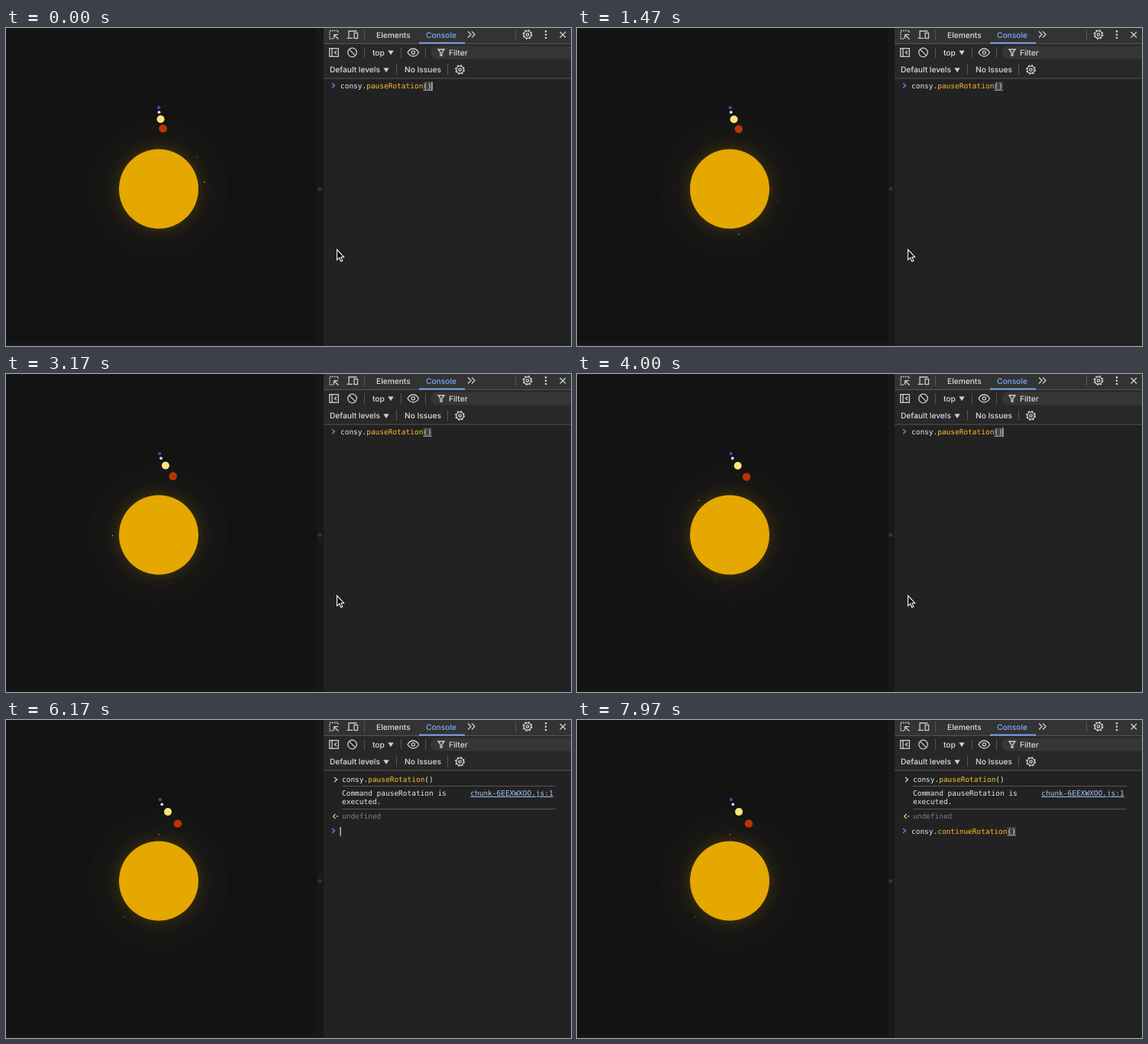
An HTML page for the animation above (8 s loop, 740 px wide and 416 px high).

```html
<!DOCTYPE html>
<html lang="en">
<head>
<meta charset="utf-8">
<title>Console and orbits</title>
<style>
  html, body { margin: 0; width: 100%; height: 100%; overflow: hidden; background: #131313; }
  svg { display: block; width: 740px; height: 416px; }
  text { text-rendering: geometricPrecision; white-space: pre; }
  .ui { font: 500 10.2px Inter, sans-serif; fill: #dedede; }
  .code { font: 9.48px "DejaVu Sans Mono", monospace; fill: #e8e8e8; }
  .fn { fill: #fbbf2d; }
  .line { fill: none; stroke: #cfcfcf; stroke-width: 1.3; }
  .rule { fill: none; stroke: #555; }
  .prompt { fill: none; stroke: #5c92ee; stroke-width: 1.3; }
</style>
</head>
<body>
<svg viewBox="0 0 740 416">
  <defs>
    <radialGradient id="glow" gradientUnits="userSpaceOnUse" cx="200" cy="210.5" r="92">
      <stop offset=".56" stop-color="#e5a800" stop-opacity=".13"/>
      <stop offset=".64" stop-color="#e5a800" stop-opacity=".065"/>
      <stop offset=".76" stop-color="#b09040" stop-opacity=".025"/>
      <stop offset="1" stop-color="#999" stop-opacity=".012"/>
    </radialGradient>
    <g id="gear">
      <circle r="4.7" class="line"/>
      <circle r="5.6" class="line" stroke-dasharray="2.2 2.2" style="stroke-width:1.7"/>
      <circle r="1.7" class="line"/>
    </g>
    <path id="chevron" d="M-2-3 1.5 0-2 3"/>
    <path id="caretDown" d="M-3.7-2.5H3.7L0 3.2Z" fill="#cfcfcf"/>
  </defs>

  <rect width="740" height="416" fill="#131313"/>
  <rect y="411.5" width="416" height="4.5" fill="#181818"/>
  <circle cx="200" cy="210.5" r="92" fill="url(#glow)"/>
  <circle cx="200" cy="210.5" r="52" fill="#e5a800"/>
  <g id="orbits"></g>

  <rect x="407" width="9" height="416" fill="#181818"/>
  <circle cx="411" cy="210.5" r="2.6" fill="#333"/>

  <rect x="416" width="324" height="416" fill="#222"/>
  <rect x="416" width="324" height="20" fill="#333"/>
  <rect x="416" y="20" width="324" height="46" fill="#282828"/>
  <path class="rule" d="M416 20.5H740M416 66H740"/>
  <path class="rule" d="M469.5 2V16M667.5 2V16M469.5 25V39M517.5 25V39M549.5 25V39M511.5 47V61M578.5 47V61"/>
  <rect x="541" y="18.7" width="60" height="1.8" fill="#7cacf8"/>

  <path class="line" d="M428 14H424V3.5H435V7" stroke-dasharray="1.7 1.2"/>
  <path class="line" d="M429.5 8.7H435M429.5 8.7V14M429.5 8.7 435.5 14.7"/>
  <path class="line" d="M459.5 4H449V12.5M446.5 13.3H454"/>
  <rect class="line" x="456" y="6.5" width="4.5" height="7"/>
  <path class="line" d="M605 4.5 609 8.5 605 12.5M610 4.5 614 8.5 610 12.5"/>
  <use href="#gear" x="683" y="8.5"/>
  <g fill="#cfcfcf"><circle cx="707" cy="4.4" r="1.3"/><circle cx="707" cy="8.7" r="1.3"/><circle cx="707" cy="13" r="1.3"/></g>
  <path class="line" d="M725.5 5 733 12.5M733 5 725.5 12.5"/>
  <text class="ui" x="485" y="12.6">Elements</text>
  <text class="ui" x="550" y="12.6" style="fill:#7cacf8">Console</text>

  <rect class="line" x="423.7" y="26.7" width="11.6" height="10.6"/>
  <path class="line" d="M427 27V37M433 29.7 430.3 32 433 34.3"/>
  <circle class="line" cx="453.5" cy="32" r="5.8"/>
  <path class="line" d="M449.4 27.9 457.6 36.1"/>
  <text class="ui" x="480" y="35.7">top</text>
  <use href="#caretDown" x="504" y="32"/>
  <path class="line" d="M526 32Q529 27 533.3 27T540.6 32Q537.6 37 533.3 37T526 32Z"/>
  <circle class="line" cx="533.3" cy="32" r="2.1"/>
  <rect x="556" y="23.5" width="192" height="17" rx="8.5" fill="#363636"/>
  <path class="line" d="M566 28H574L571 32V36H569V32Z"/>
  <text class="ui" x="580" y="35.7">Filter</text>

  <text class="ui" x="424" y="58.2">Default levels</text>
  <use href="#caretDown" x="498" y="54.8"/>
  <text class="ui" x="522" y="58.2">No Issues</text>
  <use href="#gear" x="594.5" y="54.5"/>

  <g id="sent">
    <use href="#chevron" x="432" y="78" class="line"/>
    <text class="code" x="440" y="81">consy.<tspan class="fn">pauseRotation</tspan>()</text>
  </g>
  <g id="output">
    <path class="rule" d="M440 86.5H720M440 116.5H720"/>
    <text class="code" x="440" y="99">Command pauseRotation is</text>
    <text class="code" x="440" y="110">executed.</text>
    <text class="code" x="608.3" y="99" style="fill:#a8c7fa" text-decoration="underline">chunk-6EEXWXOO.js:1</text>
    <path class="line" d="M431.5 123 428.5 126 431.5 129" style="stroke-width:1.1"/>
    <circle cx="433.8" cy="126" r="1" fill="#cfcfcf"/>
    <text class="code" x="440" y="129" style="fill:#7d7d7d">undefined</text>
  </g>

  <g id="input">
    <use href="#chevron" x="429" y="-.8" class="prompt"/>
    <g id="brackets">
      <rect width="11.4" height="11" y="-5.7" fill="#414141"/>
      <path d="M0 5.4H11.4" stroke="#aaa"/>
    </g>
    <text class="code" x="438" y="3.2"><tspan id="object"></tspan><tspan id="method" class="fn"></tspan><tspan id="parens"></tspan></text>
    <rect id="caret" y="-5.5" width="1.1" height="11.5" fill="#f0f0f0"/>
  </g>

  <path id="pointer" d="M433.5 290V303.3L436.6 300.5 438.6 305.3 440.8 304.4 438.8 299.7H442.6Z" fill="#000" stroke="#fff" stroke-width="1.1"/>
</svg>
<script>
const LOOP = 8000, ENTER = 4715, OUTPUT = 4870;
const TYPE_START = 6500, TYPE_END = 7350;
const CHAR = 5.71;
const $ = id => document.getElementById(id);

// orbit radius, start angle (deg), deg per ms, size, colour
const bodies = [
  [106.3, -89.9, .0002, 2.1, '#2f50b8'],
  [100.3, -89.7, .00045, 1.9, '#cfdcea'],
  [91.2, -88.4, .00127, 5, '#fbe57c'],
  [79.1, -86, .00305, 5.3, '#b93305'],
  [60.6, -8.4, .0591, .7, '#c8c4a8'],
  [65.2, -39.9, .0368, .6, '#85887a']
].map(([radius, start, speed, size, fill]) => {
  const el = document.createElementNS('http://www.w3.org/2000/svg', 'circle');
  el.setAttribute('r', size);
  el.setAttribute('fill', fill);
  $('orbits').append(el);
  return { el, radius, start, speed };
});

function show(id, on) {
  $(id).style.display = on ? '' : 'none';
}

function setInput(y, method, typed, caretOn) {
  const methodEnd = 6 + method.length;
  const full = `consy.${method}()`;
  const text = full.slice(0, typed);
  $('input').setAttribute('transform', `translate(0 ${y})`);
  $('object').textContent = text.slice(0, 6);
  $('method').textContent = text.slice(6, methodEnd);
  $('parens').textContent = text.slice(methodEnd);
  $('brackets').setAttribute('transform', `translate(${438 + methodEnd * CHAR} 0)`);
  show('brackets', typed >= full.length);
  $('caret').setAttribute('x', 437.5 + text.length * CHAR);
  show('caret', caretOn);
}

const blink = elapsed => elapsed % 1000 < 500;

function draw(t) {
  const orbitTime = Math.min(t, ENTER);
  for (const { el, radius, start, speed } of bodies) {
    const angle = (start + speed * orbitTime) * Math.PI / 180;
    el.setAttribute('cx', 200 + radius * Math.cos(angle));
    el.setAttribute('cy', 210.5 + radius * Math.sin(angle));
  }
  show('sent', t >= ENTER);
  show('output', t >= OUTPUT);
  show('pointer', t < ENTER);

  if (t < ENTER) {
    setInput(76, 'pauseRotation', 21, blink(t + 470));
  } else {
    const progress = (t - TYPE_START) / (TYPE_END - TYPE_START);
    const typed = Math.floor(24 * Math.max(0, Math.min(1, progress)));
    const caretOn = progress < 0 ? blink(t - ENTER) : progress < 1 || blink(t - TYPE_END);
    setInput(t < OUTPUT ? 97.5 : 145.5, 'continueRotation', typed, caretOn);
  }
}

const begin = performance.now();
function tick() {
  draw((performance.now() - begin) % LOOP);
  requestAnimationFrame(tick);
}
tick();
</script>
</body>
</html>
```
